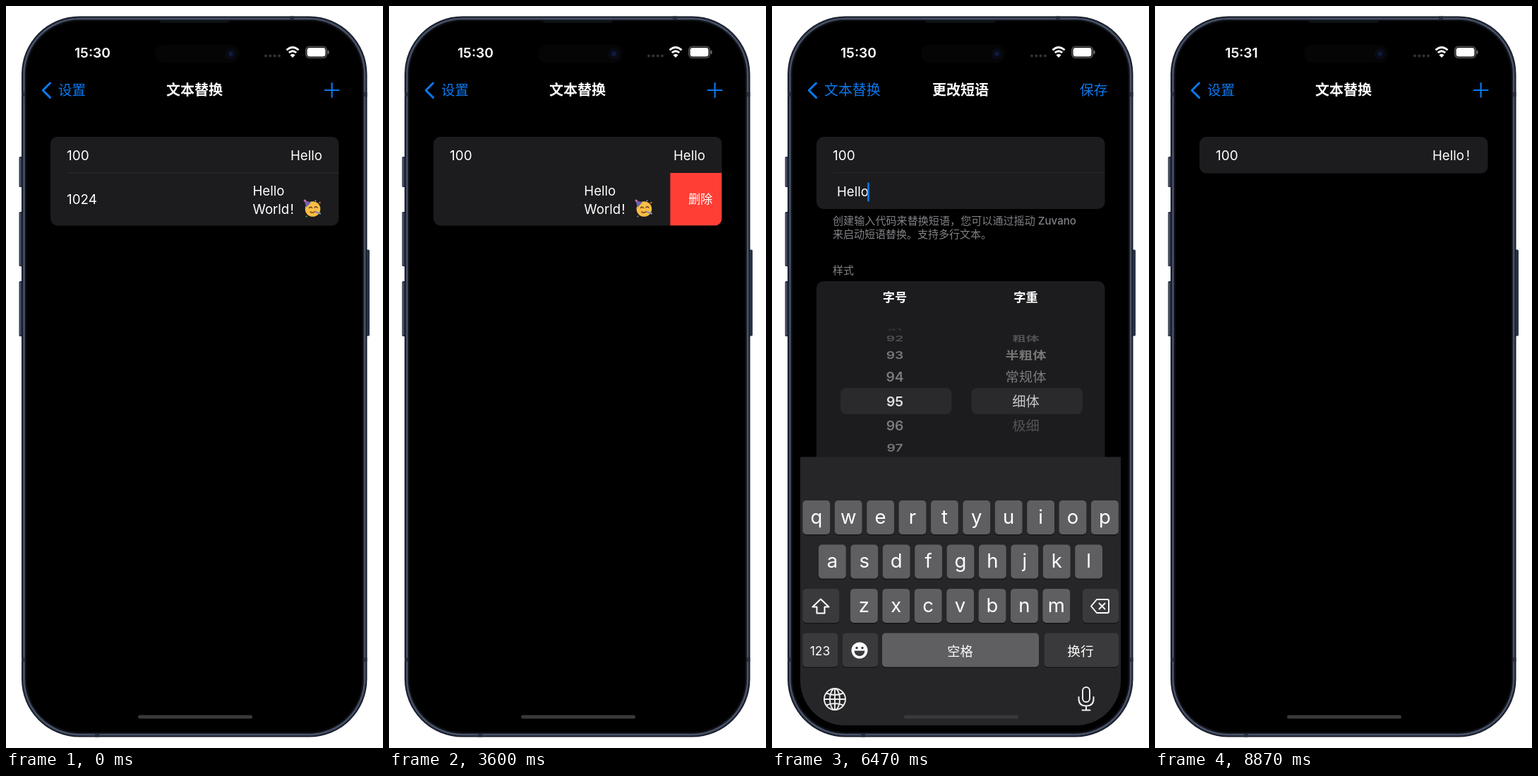
An HTML page for the animation above (9870 ms loop, 534 by 1049 pixels).

```html
<!DOCTYPE html>
<html lang="zh-CN">
<head>
<meta charset="utf-8">
<title>文本替换</title>
<style>
html, body { margin: 0; width: 100%; height: 100%; overflow: hidden; background: #fff; }
svg { display: block; width: 100%; height: 100%; font-family: Inter, "Noto Sans CJK SC", "Noto Sans CJK", sans-serif; }
text { white-space: pre; }
</style>
</head>
<body>
<svg id="stage" viewBox="0 0 534 1049"></svg>
<script>
const LOOP = 9870, TICK = 1000 / 15, PAGE = 454, REST = 85.4, ROW = 75;
const BLUE = '#0a78ee', CARD = '#1c1c1e', PANEL = '#2a2a2d', RULE = '#2b2b2e', GREY = '#828287';

// Markup helpers; text is placed by its visual centre line.
const text = (x, cy, s, size, fill = '#fff', weight = 400, anchor = 'start', more = '') =>
  `<text x="${x}" y="${cy + size * .37}" font-size="${size}" fill="${fill}" font-weight="${weight}" text-anchor="${anchor}" ${more}>${s}</text>`;
const mid = (x, cy, s, size, fill, weight, more) => text(x, cy, s, size, fill, weight, 'middle', more);
const box = (x, y, w, h, fill, r = 0, more = '') =>
  `<rect x="${x}" y="${y}" width="${w}" height="${h}" rx="${r}" fill="${fill}" ${more}/>`;
const line = (d, color = '#fff', width = 2, more = '') =>
  `<path d="${d}" fill="none" stroke="${color}" stroke-width="${width}" stroke-linecap="round" stroke-linejoin="round" ${more}/>`;
const dot = (x, y, r, fill) => `<circle cx="${x}" cy="${y}" r="${r}" fill="${fill}"/>`;
const group = (id, body, more = '') => `<g id="${id}" ${more}>${body}</g>`;
const each = (n, f) => Array.from({ length: n }, (_, i) => f(i)).join('');

function phone() {
  const buttons = [[18.5, 213, 43], [18.5, 291, 77], [18.5, 389, 78], [509, 344.5, 122]];
  const shells = [[0, '#141924'], [1.5, '#2f394e'], [3, '#566179'], [4.3, '#20242e'], [5.6, '#0a0b0e'], [7.5, '#000']];
  return buttons.map(([x, y, h]) => box(x, y, 6, h, '#2b3344', 1.5) + box(x + 1.2, y + 2, 1.4, h - 4, '#4d576c')).join('') +
    shells.map(([d, c]) => box(22 + d, 14.5 + d, 489.5 - 2 * d, 1019 - 2 * d, c, 82 - d)).join('') +
    [122, 921].map(y => box(22, y, 4.5, 6, '#262d3c') + box(507, y, 4.5, 6, '#262d3c')).join('') +
    box(402, 14.5, 6, 4.5, '#262d3c') + box(126, 1029, 6, 4.5, '#262d3c') +
    box(218, 20, 98, 3.5, '#11141c', 1.7);
}

function statusBar() {
  return box(211, 54.5, 120, 26, '#050506', 13) + dot(318.5, 67.5, 8, '#080a14') + dot(318.5, 67.5, 3.2, '#101a3e') +
    mid(122.5, 66, '15:30', 19.3, '#fff', 600, 'id="clock"') +
    each(4, i => dot(368 + i * 6.3, 70.5, 2, '#333335')) +
    line('M397.5 62.3Q406 54.5 414.5 62.3M400.8 66Q406 61.4 411.2 66', '#fff', 2.9, 'style="stroke-linecap:butt"') +
    `<path d="M406 73l-3.6-3.8q3.6-3 7.2 0z" fill="#fff"/>` +
    box(424.8, 57.3, 29.5, 16, '#000', 5, 'stroke="#77777a" stroke-width="1.1"') +
    box(426.5, 59, 26, 12.6, '#fff', 3.6) + box(455.6, 62.7, 1.8, 5.2, '#77777a', .9);
}

function navBar() {
  return line('M62.5 109L52.2 119.2L62.5 129.4', BLUE, 3) +
    group('oldBack', text(74, 119, '设置', 19.5, BLUE)) +
    group('newBack', text(74, 119, '文本替换', 19.9, BLUE)) +
    group('oldTitle', mid(267, 119, '文本替换', 20, '#fff', 700)) +
    group('newTitle', mid(267, 119, '更改短语', 20, '#fff', 700)) +
    group('plus', line('M451.8 119H471.4M461.6 109.2V128.8', BLUE, 2.2)) +
    group('save', text(436, 119, '保存', 19.7, BLUE));
}

function partyFace() {
  return dot(434.5, 287, 10.8, '#f8bd45') +
    '<path d="M422.5 274.5l9.5 3.2-7 7z" fill="#6d62b0"/>' +
    dot(423.4, 275.2, 1.6, '#d86aa0') +
    line('M429.5 285.5q2-2.4 4 0M437 285q2-2.4 4 0', '#6a421c', 1.4) +
    line('M431 291q3.5 2.6 6.5-.3', '#8a4a18', 1.6) +
    line('M438.5 291l6.5 2.5', '#7d8fb8', 2.2) + dot(444.5, 278, 1.3, '#d9604a') +
    dot(438.5, 275.3, 1, '#62a8d8') + dot(425.5, 297.5, 1.1, '#62a86c');
}

function listPage() {
  const second =
    box(87, 235.3, 384.5, .9, RULE) +
    group('content', text(86, 273, '1024', 18.8) + text(349.5, 261, 'Hello', 18.6) +
      text(349.5, 287, 'World', 18.6) + text(402.5, 287, '!', 18.6) + partyFace()) +
    box(63, 235.5, 0, ROW, '#87868b', 0, 'id="disable"') +
    mid(0, 273, '禁用', 17.2, '#fff', 500, 'id="disableText"') +
    box(0, 235.5, 0, ROW, '#ff3f36', 0, 'id="remove"') +
    mid(0, 273, '删除', 17.2, '#fff', 500, 'id="removeText"');
  return group('list',
    `<g clip-path="url(#cardClip)">${box(63, 185, 408.5, 126, CARD)}` +
    group('second', second) +
    box(63, 185, 408.5, 51, CARD) + box(63, 185, 408.5, 51, '#353537', 0, 'id="glow"') +
    box(87, 235.3, 384.5, .9, RULE, 0, 'id="rule"') +
    text(86, 211, '100', 19) +
    group('greeting', text(403, 211, 'Hello', 18.6)) +
    text(440.8, 211, '!', 18.6, '#fff', 400, 'start', 'id="listBang"') + '</g>');
}

function wheel(cx, items, first) {
  const fade = [.86, .42, .4, .24, .1];
  return items.map(([s, weight, color], k) => {
    const i = k + first, a = i * 19.5 * Math.PI / 180;
    return `<g transform="translate(${cx} ${559 + 104 * Math.sin(a)}) scale(1 ${Math.cos(a)})" opacity="${fade[Math.abs(i)]}">` +
      mid(0, 0, s, 19.3, color, weight) + '</g>';
  }).join('');
}

function alignIcon(cx, cy, side) {
  return line([19, 12, 19, 12].map((w, i) => {
    const x = cx - 9.5 + (19 - w) * side / 2;
    return `M${x} ${cy - 8 + i * 5.2}h${w}`;
  }).join(''), '#f2f2f2', 1.8);
}

function editPage() {
  const numbers = Array.from({ length: 9 }, (_, i) => [91 + i, 600]);
  const weights = [['粗体', 700], ['半粗体', 600], ['常规体', 400], ['细体', 300, '#e4e4e4'], ['极细', 100, '#a0a0a0']];
  const segments = y => box(86, y, 363, 37, PANEL, 8) + box(208.5, y + 2, 116, 33, '#605f67', 7);
  const lower =
    text(86, 303, '创建输入代码来替换短语，您可以通过摇动 Zuvano', 15.1, GREY, 500) +
    text(86, 322, '来启动短语替换。支持多行文本。', 15, GREY, 500) +
    text(86, 373, '样式', 15, GREY, 500) +
    box(63, 389, 408.5, 444, CARD, 10) +
    mid(174, 412, '字号', 17.2, '#fff', 600) + mid(359.5, 412, '字重', 17.2, '#fff', 600) +
    box(97, 540, 157.5, 37, PANEL, 8) + box(282.5, 540, 157.5, 37, PANEL, 8) +
    wheel(174, numbers, -4) + wheel(359.5, weights, -3) +
    segments(692.7) + segments(737.9) +
    [145.5, 266.5, 387.5].map((x, i) => alignIcon(x, 711.3, i)).join('') +
    line('M138.5 748.5h14M145.5 764V752.5M140.8 757l4.7-4.7 4.7 4.7', '#f2f2f2', 1.8) +
    line('M258 756.5h17M266.5 746v7.5M263 750.5l3.5 3.5 3.5-3.5M266.5 767v-7.5M263 762.5l3.5-3.5 3.5 3.5', '#f2f2f2', 1.8) +
    line('M380.5 765h14M387.5 748.5V760.5M382.8 756l4.7 4.7 4.7-4.7', '#f2f2f2', 1.8) +
    text(95.5, 802, '行间距', 19.6) + text(318, 802, '10', 19, '#fff', 400, 'end') +
    box(341, 783.5, 107.5, 37, PANEL, 8) +
    line('M358.5 802h15M413.5 802h15M421 794.5v15', '#fff', 2);
  return group('edit', box(40, 150, PAGE, 870, '#000') +
    box(63, 185, 408.5, 102, CARD, 10, 'id="fields"') + box(87, 235.3, 384.5, .9, RULE) +
    text(86, 211, '100', 19) + text(92, 262, 'Hello', 18.6) +
    text(138.5, 262, '!', 18.6, '#fff', 400, 'start', 'id="editBang"') +
    box(135, 249.5, 2.6, 27, BLUE, 1.3, 'id="caret"') + group('lower', lower));
}

function keyboard() {
  const dark = '#3a3a3c', light = '#5f5f61';
  const key = (x, y, w, fill) => box(x, y + 1, w, 48.5, '#161617', 5) + box(x, y, w, 48, fill, 5);
  const row = (letters, x, y) => [...letters].map((c, i) =>
    key(x + i * 45.4, y, 38.8, light) + mid(x + i * 45.4 + 19.4, y + 22.5, c, 27.5)).join('');
  return group('keys', box(40, 637.5, PAGE, 400, '#262628') +
    row('qwertyuiop', 43.4, 699) + row('asdfghjkl', 66, 761.5) + row('zxcvbnm', 111, 824) +
    key(43.4, 824, 52, dark) + key(440, 824, 51, dark) +
    key(43.4, 886.5, 50, dark) + key(100, 886.5, 50, dark) +
    key(156, 886.5, 222, light) + key(385.5, 886.5, 105.5, dark) +
    line('M69 838.5L57.5 849.5H63.5V858.5H74.5V849.5H80.5Z') +
    line('M460 839h15q2 0 2 2v15q0 2-2 2h-15l-8-9.5zM463.5 844.5l8 8m0-8l-8 8', '#fff', 1.9) +
    mid(68, 911.5, '123', 17.5) + mid(266.5, 912, '空格', 18.2) + mid(437, 912, '换行', 18.7) +
    dot(124, 911, 11.5, '#fff') + dot(120, 907.5, 1.7, dark) + dot(128, 907.5, 1.7, dark) +
    `<path d="M116.5 911.5h15q-1 7.5-7.5 7.5t-7.5-7.5z" fill="${dark}"/>` +
    '<g fill="none" stroke="#eee" stroke-width="1.9"><circle cx="89" cy="980" r="15"/><ellipse cx="89" cy="980" rx="7" ry="15"/>' +
    '<path d="M89 965v30M74 980h30M77 971.5q12 5 24 0M77 988.5q12-5 24 0"/></g>' +
    box(440, 963, 10, 21, 'none', 5, 'stroke="#eee" stroke-width="2"') +
    line('M434.5 977v2.5q0 10 10.5 10t10.5-10V977M445 989.5v6M439.5 995.5h11', '#eee', 2));
}

const stage = document.getElementById('stage');
stage.innerHTML =
  `<defs><clipPath id="screen">${box(40, 33, PAGE, 984, '#000', 63.5)}</clipPath>` +
  `<clipPath id="cardClip">${box(63, 185, 408.5, 126, '#000', 10, 'id="cardShape"')}</clipPath></defs>` +
  phone() + `<g clip-path="url(#screen)">${listPage() + editPage() + statusBar() + navBar() + keyboard()}` +
  box(187, 1002.5, 162, 5, '#39393b', 2.5) + '</g>';

const parts = {};
stage.querySelectorAll('[id]').forEach(el => parts[el.id] = el);
const set = (id, attrs) => { for (const k in attrs) parts[id].setAttribute(k, attrs[k]); };
const move = (id, x, y = 0) => set(id, { transform: `translate(${x} ${y})` });
const show = (id, on) => set(id, { opacity: Math.max(0, Math.min(1, +on)) });

// Critically damped settle from 0 to 1.
function settle(t, start, rate) {
  const u = Math.max(0, t - start) * rate / 1000;
  const p = 1 - (1 + u) * Math.exp(-u);
  return p > .988 ? 1 : p;
}

function track(t, keys) {
  const i = keys.findIndex(k => k[0] > t);
  if (i < 0) return keys[keys.length - 1][1];
  if (!i) return keys[0][1];
  const [t0, a] = keys[i - 1], [t1, b] = keys[i];
  return a + (b - a) * (t - t0) / (t1 - t0);
}

const SWIPE = [[870, 0], [1400, 222.5], [1870, 320], [2330, 345], [2530, 408], [2730, 408],
  [2800, 250], [2930, 90], [3070, 25], [3270, 0], [3540, 0], [3600, -73], [3860, -408.5]];

// Distance of an action label from the card's outer edge.
function labelAt(w) {
  if (w < REST || w > 265) return w - REST / 2;
  return REST / 2 + (w - REST) * .045;
}

function drawList(t, p) {
  const off = track(t, SWIPE), right = Math.max(0, off), left = Math.max(0, -off);
  const closed = settle(t, 3850, 17);
  move('list', -.3 * PAGE * p);
  move('content', off);
  set('disable', { width: right });
  set('disableText', { x: 63 + labelAt(right) });
  show('disableText', right > 0);
  set('remove', { x: 471.5 - left, width: left });
  set('removeText', { x: 471.5 - labelAt(left) });
  show('removeText', left > 0);
  set('cardShape', { height: 125.5 - 74 * closed });
  show('second', closed < 1);
  show('rule', closed < 1 && off === 0);
  show('glow', t < 8000 ? p > 0 : p);
  const edited = t > 8000;
  move('greeting', edited ? -10 : 0);
  show('listBang', edited);
}

function drawEdit(t, p) {
  const grow = 19.5 * settle(t, 7240, 24), typed = t > 6920;
  move('edit', PAGE * (1 - p));
  show('edit', p > 0);
  set('fields', { height: 102 + grow });
  move('lower', 0, grow);
  show('editBang', typed);
  show('caret', t > 6260);
  set('caret', { x: typed ? 145.8 : 135.2 });
}

function drawNav(p) {
  move('oldBack', -57 * p);
  show('oldBack', 1 - p);
  move('oldTitle', -119 * p);
  show('oldTitle', 1 - 1.15 * p);
  move('newBack', 119 * (1 - p));
  show('newBack', (p - .4) / .6);
  move('newTitle', 216 * (1 - p));
  show('newTitle', (p - .28) / .72);
  show('plus', 1.3 * (1 - p));
  show('save', p);
}

function render(ms) {
  const t = Math.floor(ms / TICK + .06) * TICK + .1;
  let p = t < 5330 ? 0 : settle(t, 5256, 16);
  if (t > 8130) p = 1 - settle(t, 8070, 13);
  const up = t < 6260 ? 0 : settle(t, 6215, 35) * (1 - settle(t, 7225, 14));
  drawList(t, p);
  drawEdit(t, p);
  drawNav(p);
  move('keys', 0, 384 * (1 - up));
  show('keys', up > 0);
  parts.clock.textContent = t > 7260 ? '15:31' : '15:30';
}

const begin = performance.now();
function loop() {
  render((performance.now() - begin) % LOOP);
  requestAnimationFrame(loop);
}
loop();
</script>
</body>
</html>
```
